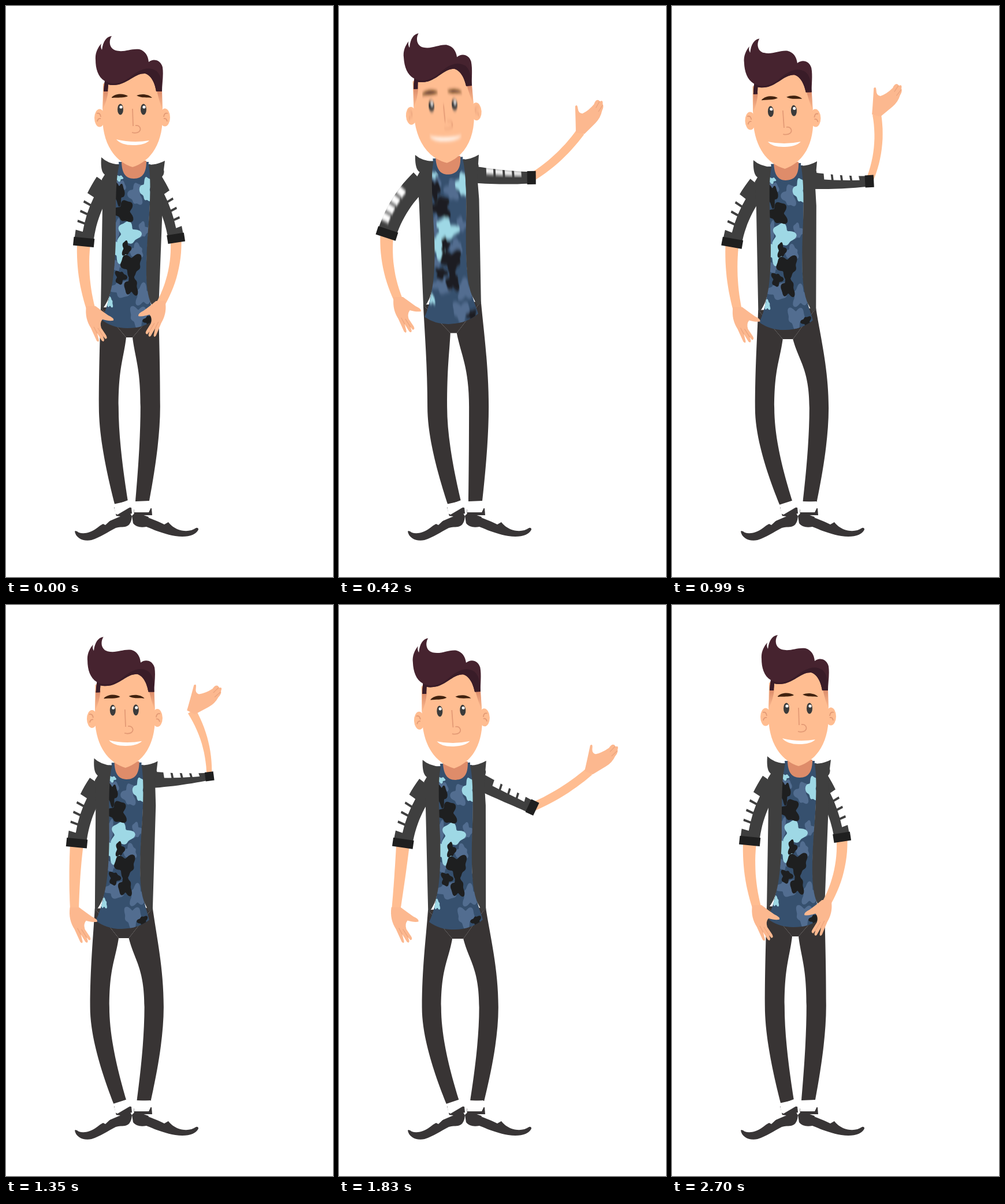
An HTML page that plays this animation: 566 by 989 pixels, repeating every 3000 ms.

```html
<!DOCTYPE html>
<html lang="en">
<head>
<meta charset="utf-8">
<title>Waving man</title>
<style>
html, body { margin: 0; width: 100%; height: 100%; overflow: hidden; background: #fff; }
svg { display: block; width: 100%; height: 100%; }
</style>
</head>
<body>
<svg viewBox="0 0 566 989" xmlns="http://www.w3.org/2000/svg">
  <defs>
    <clipPath id="shirtClip"><path d="M190 274L250 274C252 340 244 400 243 460C246 510 254 525 258 543Q238 558 210 558Q184 558 165 543C184 510 188 440 188 380Z"/></clipPath>
    <linearGradient id="fade" x1="0" y1="0" x2="0" y2="1">
      <stop offset="0" stop-color="#d98a69"/><stop offset="1" stop-color="#ffbd91"/>
    </linearGradient>
    <filter id="blur" x="-10%" y="-10%" width="120%" height="120%"><feGaussianBlur id="blurAmt" stdDeviation="0 0"/></filter>
  </defs>

  <g fill="#383434"><path id="waist"/><path id="legL"/><path id="legR"/></g>

  <g fill="#383536">
    <path d="M187 868L191 884L218 879L217 869L212 868Z"/>
    <path d="M221 872L222 882L253 882L252 870Z"/>
    <path d="M119 910Q121 908 126 912C137 916 150 910 159 903Q164 899 168 897L172 899L188 884L214 877L218 884Q217 896 211 900C204 904 199 901 190 904C176 911 164 920 148 925C134 928 121 922 119 910Z"/>
    <path d="M218 883L224 877L247 885L274 898L281 894Q286 901 296 906C309 911 320 910 329 904Q333 903 333 907C328 917 313 921 293 918C272 914 258 908 243 902Q227 905 220 896Z"/>
  </g>
  <g fill="#fff">
    <path d="M187 865L211 856L215 868L193 881L189 879Z"/>
    <path d="M220 860L250 858L250 871L247 877L222 877Z"/>
    <path d="M170 896L189 883L198 884Z"/>
    <path d="M246 886L253 882L280 893L274 897Z"/>
  </g>

  <g id="sleeves"></g>

  <g id="body">
    <g clip-path="url(#shirtClip)">
      <rect x="150" y="265" width="120" height="300" fill="#36506e"/>
      <g id="camo" class="soft"></g>
    </g>
    <path d="M195 270L247 270Q247 305 221 305Q196 305 195 270Z" fill="#36506e"/>
    <path d="M200 268L243 268C243 288 237 299 221 299C206 299 200 288 200 268Z" fill="#de8c6a"/>
    <g fill="#3f3f3f">
      <path d="M165 262Q176 273 196 275C190 300 190 330 190 400C189 450 185 490 176 510Q170 522 164 528L167 345L166 300L171 292Q163 287 165 262Z"/>
      <path d="M275 268Q262 275 247 275C251 300 250 340 245 400C242 450 241 490 250 513L257 528L264 526L271 345L270 296Q275 290 273 284Z"/>
    </g>
    <ellipse cx="162" cy="194" rx="9" ry="15.5" fill="#ffbd91"/>
    <ellipse cx="275" cy="193" rx="9" ry="15.5" fill="#ffbd91"/>
    <path d="M168 135L167 195C168 238 187 269 219 279C251 269 271 238 271 192L269 130L240 105L200 110Z" fill="#ffbd91"/>
    <path d="M169 146H177Q175 165 167 180Z M261 146H270L271 180Q265 165 261 146Z" fill="url(#fade)"/>
    <path d="M155 93C154 81 159 72 165 65Q163 71 166 76C168 61 174 53 183 52C177 61 179 74 190 77C205 81 216 73 231 75C241 78 246 86 247 97C256 90 268 94 271 106C273 120 270 135 270 148L260 148C258 136 253 121 241 117C225 116 214 131 195 136Q184 138 177 136L176 148L169 148Q169 139 171 130C159 123 155 108 155 93Z" fill="#46232f"/>
    <path d="M171 130C186 138 202 133 215 123C229 112 245 102 261 113Q268 120 269 132L270 148L260 148C258 136 253 121 241 117C225 116 214 131 195 136Q184 138 177 136L176 148L169 148Z" fill="#391c28"/>
    <g class="soft">
      <path d="M183 158C190 151 204 151 211 156C204 160 191 158 183 159Z M226 155C235 151 248 153 253 159C245 158 234 160 226 155Z" fill="#40220f"/>
      <g fill="#3b3b3b"><ellipse cx="198" cy="179" rx="5" ry="9.5"/><ellipse cx="238" cy="179" rx="5" ry="9.5"/></g>
      <g fill="#fff"><circle cx="199" cy="175" r="2.6"/><circle cx="239" cy="175" r="2.6"/>
        <path d="M191 231Q219 238 248 233Q240 241 220 241Q199 241 191 231Z"/></g>
      <path d="M219 178L220 208M224 207C232 206 235 214 230 218Q225 221 218 219M157 186Q163 184 164 192M158 200Q159 194 164 195M280 186Q274 184 273 192M279 200Q278 194 273 195" fill="none" stroke="#e39a75" stroke-width="1.8"/>
    </g>
  </g>

  <g id="arms"></g>
</svg>
<script>
const NS = 'http://www.w3.org/2000/svg';
const $ = id => document.getElementById(id);
const r1 = v => Math.round(v * 10) / 10;
const lerp = (a, b, k) => a + (b - a) * k;
const rad = deg => deg * Math.PI / 180;
const sinD = deg => Math.sin(rad(deg)), cosD = deg => Math.cos(rad(deg));
const poly = pts => 'M' + pts.join('L') + 'Z';

function make(parent, tag, attrs = {}) {
  const el = document.createElementNS(NS, tag);
  for (const k in attrs) el.setAttribute(k, attrs[k]);
  return parent.appendChild(el);
}
const add = (parent, d, fill, extra) => make(parent, 'path', { d, fill, ...extra });

// camouflage: wavy splats at x,y with radii rx,ry
function splat(x, y, rx, ry, phase) {
  return poly(Array.from({ length: 48 }, (_, i) => {
    const a = i * Math.PI / 24;
    const r = 1 + .22 * Math.cos(3 * a + phase) + .16 * Math.cos(5 * a - phase);
    return [r1(x + rx * r * Math.cos(a)), r1(y + ry * r * Math.sin(a))];
  }));
}
const CAMO = {
  '#526d90': '197,314,9,13 225,326,11,18 237,388,8,13 190,388,7,20 226,424,11,11 193,449,8,9 199,490,16,14 238,501,13,17 229,537,14,17',
  '#9ed8e5': '196,298,6,5 243,318,9,20 211,395,18,19 197,424,13,17 180,514,5,8',
  '#1e1f20': '196,324,8,18 205,356,15,18 208,420,7,12 217,448,17,18 217,484,11,17 198,470,9,11 247,545,8,9',
};
for (const color in CAMO)
  CAMO[color].split(' ').forEach((s, i) => add($('camo'), splat(...s.split(',').map(Number), 1 + i * 2.4), color));

// arm angles are degrees from straight down, growing outwards
const rest = { x: 0, y: 0, lean: 0, upL: 20, foreL: 6, upR: 21, foreR: -13, hand: 0 };
const rise = { x: -9, y: 39, lean: -1.2, upL: 13, foreL: 0, upR: 97, foreR: 90, hand: 50 };
const out = { x: -18, y: 3, lean: -3.6, upL: 29, foreL: 11, upR: 85, foreR: 152, hand: 0 };
const inward = { x: -10, y: 3, lean: -.5, upL: 20, foreL: -2, upR: 93, foreR: 195, hand: 23 };
const low = { x: -9, y: 4, lean: -2.3, upL: 23, foreL: -6, upR: 64, foreR: 122, hand: 20 };
const back = { x: 5, y: 3, lean: 1.4, upL: 14, foreL: 0, upR: 18, foreR: -16, hand: 0 };
const deep = { ...rise, y: 50, upR: 75, foreR: 60 };
const high = { ...out, y: -12, upL: 35, foreR: 140 };
const far = { ...low, x: -3, foreR: 100, hand: 50 };

const WAVE = 240;
const keys = [[0, rest], [165, deep], [240, rise], [470, high]];
for (let i = 0; i < 5; i++) keys.push([630 + i * WAVE, i % 2 ? inward : out]);
keys.push([1830, low], [1930, far], [2130, back], [2700, rest]);

// monotone cubic interpolation: extremes rest, passing keys keep their speed
function poseAt(t) {
  t = Math.max(0, Math.min(2700, t));
  let i = 0;
  while (i < keys.length - 2 && t >= keys[i + 1][0]) i++;
  const slope = (j, k) => j < 0 || j > keys.length - 2 ? 0 :
    (keys[j + 1][1][k] - keys[j][1][k]) / (keys[j + 1][0] - keys[j][0]);
  const tangent = (j, k) => {
    const a = slope(j - 1, k), b = slope(j, k);
    return a * b <= 0 ? 0 : 2 * a * b / (a + b);
  };
  const [t0, a] = keys[i], [t1, b] = keys[i + 1];
  const h = t1 - t0, u = (t - t0) / h, v = 1 - u, pose = {};
  for (const k in rest)
    pose[k] = a[k] * (1 + 2 * u) * v * v + tangent(i, k) * h * u * v * v +
      b[k] * u * u * (3 - 2 * u) - tangent(i + 1, k) * h * u * u * v;
  return pose;
}

// bent limb; at(t, side) gives a point across its width
function limb(a, b, bend, w0, w1) {
  const dx = b[0] - a[0], dy = b[1] - a[1], len = Math.hypot(dx, dy) || 1;
  const c = [(a[0] + b[0]) / 2 + dy / len * bend, (a[1] + b[1]) / 2 - dx / len * bend];
  return (t, side) => {
    const q = k => (1 - t) ** 2 * a[k] + 2 * t * (1 - t) * c[k] + t * t * b[k];
    const s = k => (1 - t) * (c[k] - a[k]) + t * (b[k] - c[k]);
    const n = Math.hypot(s(0), s(1)) || 1, w = lerp(w0, w1, t) / 2 * side;
    return [r1(q(0) + s(1) / n * w), r1(q(1) - s(0) / n * w)];
  };
}
const steps = Array.from({ length: 15 }, (_, i) => i / 14);
const outline = at => poly([...steps.map(t => at(t, 1)), ...steps.map(t => at(1 - t, -1))]);
const stripes = (at, side) => [0, 1, 2, 3].map(i => {
  const t = .27 + i * .15;
  return poly([at(t, side * 1.1), at(t + .115, side * 1.1), at(t + .13, side * .25), at(t + .015, side * .25)]);
}).join('');

const handDown = 'M-8 -5C-10 10 -7 22 0 33L10 55Q14 59 14 54L11 42L19 55Q23 58 23 53L21 47L25 52Q30 51 26 45L18 33Q15 24 20 18C27 20 33 21 39 20Q41 16 30 11Q20 4 8 -5Z';
const handUp = 'M-8 2Q-10 -15 -14 -43Q-11 -48 -9 -40Q-7 -31 0 -32Q10 -38 18 -50Q20 -59 25 -58L28 -56Q33 -60 33 -52Q36 -48 33 -40Q32 -28 24 -18Q16 -8 7 3Z';

function makeArm() {
  const back = $('sleeves'), front = $('arms');
  const arm = {
    sleeve: add(back, '', '#3f3f3f'),
    stripe: add(back, '', '#fff', { class: 'soft' }),
    fore: add(front, '', '#ffbd91'),
    cuff: add(front, '', '#1f1f1f'),
    hand: make(front, 'g'),
  };
  arm.palm = add(arm.hand, '', '#fcb88f');
  arm.lines = add(arm.hand, '', 'none', { stroke: '#e9a27c', 'stroke-width': 1.1 });
  return arm;
}
const left = makeArm(), right = makeArm();

// o: side, shoulder, up, fore, size, bendUp, bendFore, w0, w1, raised, turn
function drawArm(arm, o) {
  const reach = (p, deg, len) => [p[0] + o.side * len * sinD(deg), p[1] + len * cosD(deg)];
  const elbow = reach(o.shoulder, o.up, 109), wrist = reach(elbow, o.fore, 117 * o.size);
  const s = limb(o.shoulder, elbow, o.side * o.bendUp, o.w0, o.w1);
  const tip = s(1, 0), n = s(1, 1).map((v, k) => (v - tip[k]) * 2 / o.w1);
  const corner = (u, v) => [r1(tip[0] - n[1] * u + n[0] * v), r1(tip[1] + n[0] * u + n[1] * v)];
  const cw = o.w1 / 2 + 1.5;
  arm.sleeve.setAttribute('d', outline(s));
  arm.stripe.setAttribute('d', stripes(s, o.side));
  arm.cuff.setAttribute('d', poly([corner(-7, cw), corner(8, cw), corner(8, -cw), corner(-7, -cw)]));
  arm.fore.setAttribute('d', outline(limb(elbow, wrist, o.side * o.bendFore * o.size, o.w1 * .7, lerp(6, 15, o.size))));
  arm.palm.setAttribute('d', o.raised ? handUp : handDown);
  arm.lines.setAttribute('d', o.raised ? 'M27 -56L22 -44M33 -50L27 -38' : 'M11 42L5 31M21 47L12 33');
  const flip = o.raised || o.side < 0 ? 1 : -1;
  arm.hand.setAttribute('transform', `translate(${wrist.map(r1)}) rotate(${r1(o.turn)}) scale(${r1(flip * 10 * o.size) / 10} ${r1(10 * o.size) / 10})`);
}

// one leg: vertical at the knee, straight ends at crotch and ankle
function drawLeg(el, hip, crotch, knee, half, ankle, tilt) {
  const [kx, ky] = knee, f = (...p) => p.map(v => r1(v)).join(' ');
  const kOut = kx + half, kIn = kx - half;
  const aOut = [ankle[0] + tilt[0], ankle[1] + tilt[1]], aIn = [ankle[0] - tilt[0], ankle[1] - tilt[1]];
  const calf = (k, a) => f(lerp(a[0], k, .33), lerp(a[1], ky + 60, .33));
  el.setAttribute('d', `M${f(...hip)}C${f(lerp(hip[0], kOut, .35), hip[1] + 50)},${f(kOut, ky - 68)},${f(kOut, ky)}` +
    `C${f(kOut, ky + 60)},${calf(kOut, aOut)},${f(...aOut)}L${f(...aIn)}` +
    `C${calf(kIn, aIn)},${f(kIn, ky + 60)},${f(kIn, ky)}` +
    `C${f(kIn, ky - 68)},${f(lerp(crotch[0], kIn, .35), crotch[1] + 38)},${f(...crotch)}Z`);
}

// the feet stay put, so a lower body pushes the knees apart
function drawLegs(place, x, y) {
  const bend = 5.1 * Math.max(0, y) ** .7, s = bend / 66;
  const mid = 213.75 + .45 * x, ky = 694 + .75 * Math.max(0, y), half = 17 - 2 * s;
  const [cx, cy] = place(213.5, 574), gap = 5.5 + .3 * bend;
  const hipL = place(164, 522), hipR = place(264, 522);
  const inL = [cx - gap, cy], inR = [cx + gap, cy];
  drawLeg($('legL'), hipL, inL, [mid - 36 - bend, ky], -half, [199.5 - 14.5 * s, 860 + 2 * s], [-lerp(11.5, 8, s), lerp(2.5, 8.5, s)]);
  drawLeg($('legR'), hipR, inR, [mid + 36 + bend, ky], half, [236 + 15.5 * s, 857.5 + 5 * s], [12, lerp(-.5, 4.5, s)]);
  $('waist').setAttribute('d', poly([hipL, hipR, inR, inL].map(p => p.map(r1))));
}

const soft = document.querySelectorAll('.soft');
const PIVOT = [213, 545];

function draw(t) {
  const p = poseAt(t);
  const place = (x, y) => {
    const px = x - PIVOT[0], py = y - PIVOT[1], c = cosD(p.lean), s = sinD(p.lean);
    return [PIVOT[0] + p.x + px * c - py * s, PIVOT[1] + p.y + px * s + py * c];
  };
  $('body').setAttribute('transform', `translate(${r1(p.x)} ${r1(p.y)}) rotate(${p.lean.toFixed(2)} ${PIVOT})`);
  drawLegs(place, p.x, p.y);

  drawArm(left, {
    side: -1, shoulder: place(172, 306), up: p.upL, fore: -p.foreL, size: 1,
    bendUp: 14, bendFore: 5 + p.foreL, w0: 36, w1: 33, raised: false, turn: 0,
  });

  // the right forearm swings towards the viewer as it comes up, and thins when folded in
  const raised = t >= 240 && t < 2010;
  const size = 1 - .92 * Math.exp(-(((t - 240) / 75) ** 2));
  const lift = sinD(p.upR) ** 2;
  drawArm(right, {
    side: 1, shoulder: place(255, 300), up: p.upR, fore: p.foreR, size,
    bendUp: 14 - 18 * lift, bendFore: 17 * cosD(p.foreR), w0: 30,
    w1: 28 - 8 * lift - .25 * Math.max(0, p.foreR - 165), raised,
    turn: raised ? p.hand : Math.min(0, -p.foreR - 15),
  });

  // vertical motion blur on the details during the jump
  const speed = Math.abs(poseAt(t + 15).y - poseAt(t - 15).y);
  const blur = Math.min(3.2, .9 * speed - 1.5);
  $('blurAmt').setAttribute('stdDeviation', `0 ${r1(Math.max(0, blur))}`);
  soft.forEach(el => blur > 0 ? el.setAttribute('filter', 'url(#blur)') : el.removeAttribute('filter'));
}

const start = performance.now();
function tick() {
  const t = (performance.now() - start) % 3000;
  draw(Math.floor(t / 30) * 30);
  requestAnimationFrame(tick);
}
draw(0);
requestAnimationFrame(tick);
</script>
</body>
</html>
```
